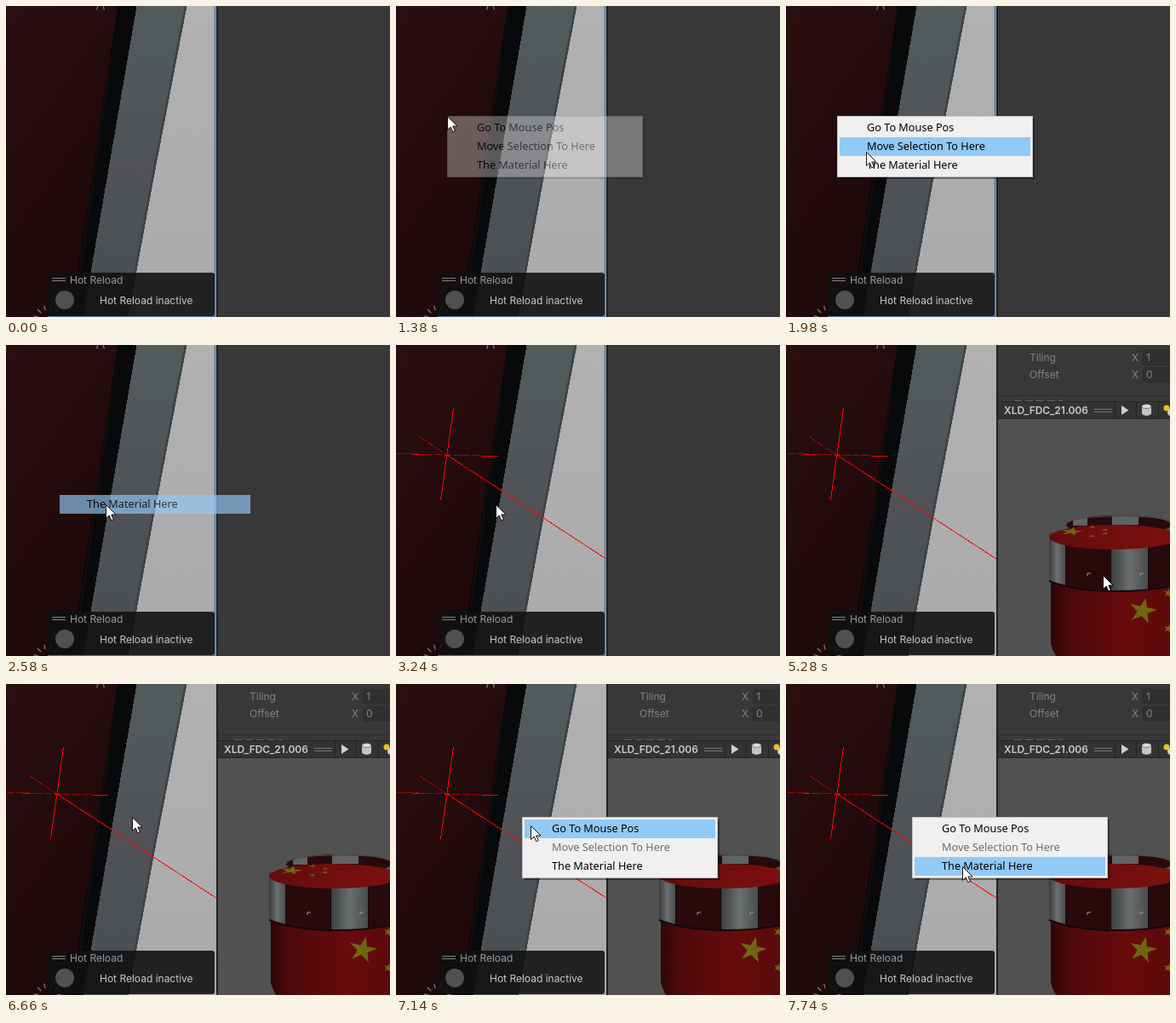
Animation, 451 px wide and 365 px high, one loop 8 s. Source, as an HTML page:

```html
<!DOCTYPE html>
<html lang="en">
<head>
<meta charset="utf-8">
<title>Scene context menu</title>
<style>
  html, body { margin: 0; width: 100%; height: 100%; overflow: hidden; background: #383838; }
  svg { display: block; width: 100vw; height: 100vh; }
  text { font: 12px Inter, sans-serif; white-space: pre; }
  .bold { font-weight: 600; }
  .menu text { font: 12.7px "Noto Sans", "Open Sans", sans-serif; }
  .crisp { shape-rendering: crispEdges; }
</style>
</head>
<body>
<svg viewBox="0 0 451 365" preserveAspectRatio="none">
  <defs>
    <linearGradient id="wall" x1="0" y1="0" x2=".5" y2="1">
      <stop offset="0" stop-color="#2a0f11"/><stop offset="1" stop-color="#1e080a"/>
    </linearGradient>
    <linearGradient id="steel" x1="0" y1="0" x2="0" y2="1">
      <stop offset="0" stop-color="#525c5b"/><stop offset=".5" stop-color="#505258"/><stop offset="1" stop-color="#4a4f52"/>
    </linearGradient>
    <linearGradient id="white" x1="0" y1="0" x2="0" y2="1">
      <stop offset="0" stop-color="#b1b1b1"/><stop offset="1" stop-color="#aaa"/>
    </linearGradient>
    <linearGradient id="barrel">
      <stop offset="0" stop-color="#2c0708"/><stop offset=".15" stop-color="#4e090a"/>
      <stop offset=".6" stop-color="#690b0c"/><stop offset="1" stop-color="#580a0b"/>
    </linearGradient>
    <linearGradient id="lid">
      <stop offset="0" stop-color="#630d0d"/><stop offset="1" stop-color="#7e0f0f"/>
    </linearGradient>
    <linearGradient id="metal">
      <stop offset="0" stop-color="#3c3e3e"/><stop offset=".5" stop-color="#6c6f6f"/><stop offset="1" stop-color="#4a4c4c"/>
    </linearGradient>
    <clipPath id="view"><rect width="247" height="365"/></clipPath>
    <clipPath id="band"><path d="M309 219V277Q340 289 385 289T460 281V219Z"/></clipPath>
  </defs>

  <rect width="451" height="365" fill="#383838"/>
  <g clip-path="url(#view)">
    <g class="crisp">
      <rect width="247" height="365" fill="url(#white)"/>
      <path d="M0 0H131L76 365H0Z" fill="url(#wall)"/>
      <path d="M131 0H153.500L90.500 365H76Z" fill="#07090a"/>
      <path d="M153.500 0H212.500L173.500 202 143.500 365H90.500Z" fill="url(#steel)"/>
    </g>
    <path d="M211 0 172 202 142 365" stroke="#3e4445" stroke-width="2.500" fill="none"/>
    <path d="M124 58 83 340" stroke="#290d0f"/>
    <g id="gizmos" stroke="#777" stroke-width="1.300"></g>
    <g id="rays" class="crisp" stroke="#f00" fill="none">
      <path d="M60.500 129.500 247.500 251.500M67.500 74 52.500 182M20 128.500H43M57 129.500H64M100 130.500H120"/>
      <path d="M28 108 60.500 129.500M1 127.500H8L100 130" stroke="#9c0507" stroke-dasharray="9 2"/>
    </g>
  </g>
  <path id="focus" d="M245.500 0V364.500H49" stroke="#4c74ad" stroke-width="1.500" fill="none"/>
  <rect x="247" width="2" height="365" fill="#202020"/>
  <rect x="49" y="313" width="196" height="51" rx="3" fill="#101010" fill-opacity=".89"/>
  <path d="M54 319.500H70M54 322.500H70" stroke="#808080"/>
  <text x="75" y="326" fill="#999">Hot Reload</text>
  <circle cx="69" cy="345" r="11" fill="#505050"/>
  <text x="110" y="350" fill="#c8c8c8">Hot Reload inactive</text>

  <g id="panel">
    <g id="fields" fill="#838383"></g>
    <path d="M249 59.500H451" stroke="#2c2c2c"/>
    <path d="M268 65.500H325" stroke="#666" stroke-dasharray="9 4"/>
    <rect x="249" y="66" width="202" height="21" fill="#333"/>
    <path d="M249 66.500H451M249 86.500H451M386.500 67V86M411.500 67V86M437.500 67V86" stroke="#242424"/>
    <text class="bold" x="256" y="81" fill="#cacaca">XLD_FDC_21.006</text>
    <path d="M362 75.500H383M362 78.500H383" stroke="#777"/>
    <path d="M394 71 402.500 76.500 394 82Z" fill="#d0d0d0"/>
    <path d="M418 72V81Q423.500 85 429 81V72Z" fill="#c4c4c4"/>
    <ellipse cx="423.500" cy="72" rx="5.500" ry="2.500" fill="#ddd" stroke="#555" stroke-width=".7"/>
    <circle cx="447" cy="74" r="3.500" fill="#f3bd24"/><circle cx="452" cy="79" r="4" fill="#ccc"/>
    <rect x="249" y="87" width="202" height="278" fill="#515151"/>

    <path d="M311 270V350Q313 360 319 367H460V270Z" fill="url(#barrel)"/>
    <ellipse cx="391" cy="211" rx="62" ry="11" fill="#260b0c"/>
    <path d="M337 206Q343 203 354 202V212H337ZM383 200.500Q398 200 414 201V211H383Z" fill="#606363"/>
    <path d="M329 211Q333 201 391 201T452 208" stroke="#4c4c4c" fill="none"/>
    <g clip-path="url(#band)">
      <rect x="309" y="215" width="145" height="76" fill="#280a0c"/>
      <rect x="309" y="215" width="19" height="76" fill="url(#metal)"/>
      <rect x="382" y="215" width="43" height="76" fill="url(#metal)"/>
      <path d="M328.500 215V290M381.500 215V290M425.500 215V290" stroke="#120b0b"/>
      <path d="M354 271V268H358M416 271V268H420" stroke="#999" fill="none"/>
    </g>
    <path d="M309 277Q340 289 385 289T460 281" stroke="#170607" stroke-width="2" fill="none"/>
    <ellipse cx="385" cy="225.500" rx="76" ry="14.500" fill="url(#lid)"/>
    <g id="stars" fill="#6e6611"></g>
  </g>

  <g id="menu" class="menu"></g>
  <path id="arrow" d="M.5.5V16.500L4.200 13 6.700 18.800 9.300 17.700 6.800 12H12Z" fill="#fff" stroke="#000" stroke-width=".9"/>
  <g id="eye" fill="none" stroke="#ddd" stroke-width="1.400">
    <path d="M-8 0Q0-9 8 0 0 9-8 0Z"/><circle r="2.500" fill="#ddd"/>
  </g>
</svg>
<script>
const $ = id => document.getElementById(id);
const LOOP = 8000, STEP = 60, ROW = 22;
const repeat = (n, make) => Array.from({ length: n }, (_, i) => make(i)).join("");
const polar = (x, y, rx, ry, angle) => [x + rx * Math.cos(angle), y + ry * Math.sin(angle)];

const sunRays = (x, y) => repeat(12, i => {
  const [a, b] = [11, 17].map(r => polar(x, y, r, r, (i + .5) * Math.PI / 6));
  return `<path d="M${a}L${b}"/>`;
});
$("gizmos").innerHTML = sunRays(111, -12) + sunRays(49, 368);

const star = (x, y, rx, ry) => `<polygon points="${repeat(10, i =>
  polar(x, y, ...[rx, ry].map(r => i % 2 ? r * .382 : r), i * Math.PI / 5 - 1.35) + " ")}"/>`;

// One large star with an arc of four small ones beside it.
const flag = (x, y, rx, ry, reachX, reachY) => star(x, y, rx, ry) + repeat(4, i =>
  star(...polar(x, y, reachX, reachY, (i - 1.5) * Math.PI / 5), rx / 3, ry / 3));
$("stars").innerHTML = flag(335, 219, 14, 5, 42, 6.5) + flag(419, 312, 17, 16, 51, 26);

$("fields").innerHTML = [["Tiling", 1], ["Offset", 0]].map(([name, value], i) => `
  <g transform="translate(0 ${20 * i})">
    <rect x="419.5" y="6.500" width="40" height="17" rx="2" fill="#303030" stroke="#2d2d2d"/>
    <text x="286" y="19">${name}</text><text x="406" y="19">X</text><text x="423" y="19">${value}</text>
  </g>`).join("");

const labels = ["Go To Mouse Pos", "Move Selection To Here", "The Material Here"];
$("menu").innerHTML = `<g id="sheet">
  <path d="M3 73H231V3" fill="none" stroke="#000" stroke-opacity=".4" stroke-width="2"/>
  <rect x=".5" y=".5" width="229" height="71" fill="#f0f0f0" stroke="#c4c4c4"/></g>` +
  labels.map((label, i) => `<g class="item" transform="translate(0 ${ROW * i})">
    <rect x="3" y="3" width="224" height="${ROW}" fill="#91c9f7"/>
    <text x="35" y="18">${label}</text></g>`).join("");
const items = [...document.querySelectorAll(".item")];

// Pointer moves: start, end, x, y.
const moves = [
  [300, 1140, 60, 129], [1740, 1980, 94, 171], [1980, 2220, 117, 187],
  [3660, 4020, 352, 237], [4020, 4500, 378, 261], [4500, 4740, 397, 274],
  [4740, 5100, 333, 234], [5100, 5280, 372, 270], [5520, 6300, 148, 156], [7080, 7740, 207, 214]
];
const menus = [
  { x: 60, y: 129, open: 1380, pick: 2520 },
  { x: 148, y: 156, open: 6720, pick: LOOP, disabled: 1 }
];

const easeOut = k => 1 - (1 - k) ** 2;

function pointerAt(t) {
  let x = 331, y = 86;
  for (const [start, end, toX, toY] of moves) {
    if (t < start) break;
    const k = easeOut(Math.min(1, (t - start) / (end - start)));
    x += (toX - x) * k;
    y += (toY - y) * k;
  }
  return [Math.round(x), Math.round(y)];
}

const show = (el, on) => el.style.display = on ? "" : "none";
const place = (el, x, y) => el.setAttribute("transform", `translate(${x} ${y})`);

function drawMenu(t, y) {
  const menu = menus.find(m => t >= m.open && t < m.pick + 300);
  show($("menu"), menu);
  if (!menu) return;
  const picked = t >= menu.pick;
  const hover = Math.floor((y - menu.y - 3) / ROW);
  place($("menu"), menu.x, menu.y);
  $("menu").style.opacity = picked
    ? 1 - (t - menu.pick + STEP) / 360
    : Math.min(1, ((t - menu.open) / STEP + 1) * .35);
  show($("sheet"), !picked);
  items.forEach((item, i) => {
    const [bar, label] = item.children;
    const off = i === menu.disabled;
    show(item, !picked || i === hover);
    show(bar, i === hover && !off);
    label.setAttribute("fill", off ? "#6d6d6d" : "#000");
  });
}

function draw(now) {
  const t = Math.floor(now % LOOP / STEP) * STEP;
  const [x, y] = pointerAt(t);
  const looking = menus.some(m => t >= m.open - 2 * STEP && t < m.open - STEP);
  place($("arrow"), x, y);
  place($("eye"), x, y);
  show($("arrow"), t >= 300 && !looking);
  show($("eye"), looking);
  show($("rays"), t >= 3240);
  show($("panel"), t >= 3300);
  show($("focus"), t < 3300);
  drawMenu(t, y);
}

const start = performance.now();
function tick() {
  draw(performance.now() - start);
  requestAnimationFrame(tick);
}
tick();
</script>
</body>
</html>
```
